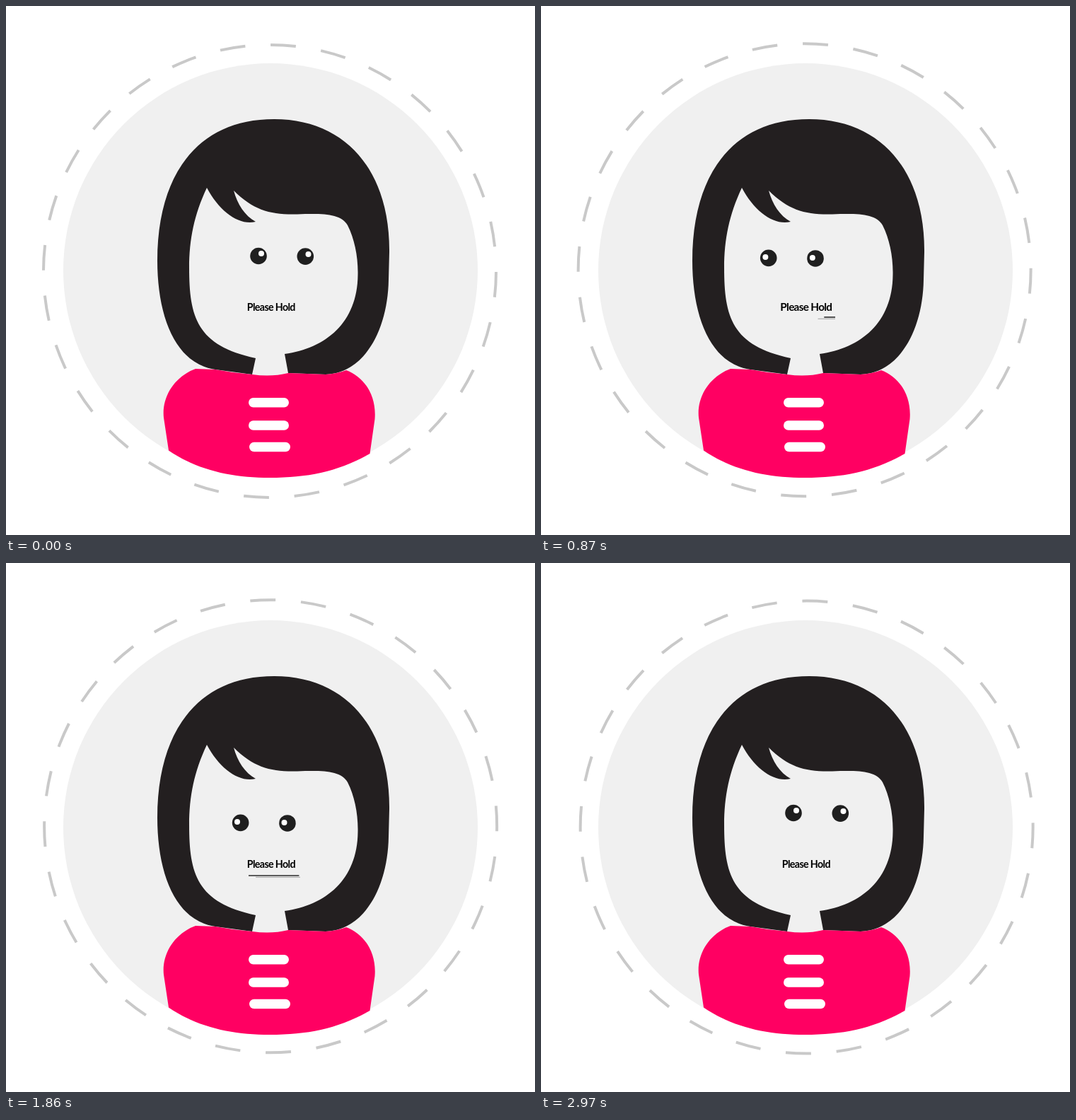
Animation, 748 px wide and 748 px high, one loop 3 s. Source, as an HTML page:

```html
<!DOCTYPE html>
<html lang="en">
<head>
<meta charset="utf-8">
<title>Please Hold</title>
<style>
  html, body { margin: 0; width: 100%; height: 100%; overflow: hidden; background: #fff; }
  svg { display: block; width: 748px; height: 748px; }
  #label {
    font-family: Lato, "Open Sans", sans-serif;
    font-weight: 700;
    letter-spacing: -.045em;
    text-anchor: middle;
  }
</style>
</head>
<body>
<svg viewBox="0 0 748 748">
  <g id="ring">
    <circle cx="373" cy="374.9" r="320" fill="none" stroke="#c9c9c9" stroke-width="4"
            pathLength="56" stroke-dasharray="1 1"/>
  </g>
  <circle cx="374" cy="374" r="293" fill="#f0f0f0"/>

  <path id="hair" fill="#231f20" d="M379 160 C482 160 543 235 542 348 L541 387
    C540 456 508 519 452 521 L399 519 L394 492 C452 484 497 448 497.5 380
    C498 355 493 330 483 310 C473 293 447 293.5 412 294.5 C375 295.5 350 289 322 261
    C327 280 338 297 353 305 C330 311 302 291 284 257 C266 295 259 330 259 370
    C259 440 270 480 353 498 L348 521 L296 514 C240 506 214 440 214 360
    C214 237 272 160 379 160Z"/>
  <path id="shirt" fill="#ff0062" d="M268 513 L296 514 Q322 519 348 521 Q375 525 399 519
    L452 521 Q468 520 481 515 C508 525 524 552 521.5 584 L514.5 633
    C470 658 428 667 373 667 C320 667 272 657 230 628.5
    L223 582 C220 553 238 524 268 513Z"/>
  <g fill="#fff">
    <rect x="343" y="554" width="57" height="13.5" rx="6.7"/>
    <rect x="343" y="586.3" width="57" height="13.5" rx="6.7"/>
    <rect x="344" y="616.8" width="58" height="13.5" rx="6.7"/>
  </g>

  <g id="pupils" fill="#1f1f1f">
    <circle r="11.8"/>
    <circle cx="66.3" cy=".6" r="11.8"/>
  </g>
  <g id="glints" fill="#fff">
    <circle r="4"/>
    <circle cx="66.5" cy="1" r="4"/>
  </g>

  <line id="shade" stroke="#a0a0a0" stroke-width="1"/>
  <line id="stroke" stroke="#2b2b2b" stroke-width="1.6"/>
  <g id="pulse"><text id="label" y="5.5">Please Hold</text></g>
</svg>
<script>
  const $ = id => document.getElementById(id);
  const LOOP = 3000, STEP = 30;

  // [time, value] pairs joined by a smooth monotone curve
  const LOOK = [[0, 0], [570, .667], [870, .94], [1000, 1], [1500, 1],
                [1860, .64], [2460, .03], [2550, 0], [3000, 0]];
  const SWELL = [[0, 0], [360, .03], [570, .2], [870, .68], [1010, 1], [1380, .2], [1500, 0]];

  function slope(keys, i) {
    if (i === 0 || i === keys.length - 1) return 0;
    const rise = j => (keys[j + 1][1] - keys[j][1]) / (keys[j + 1][0] - keys[j][0]);
    const a = rise(i - 1), b = rise(i);
    return a * b <= 0 ? 0 : 2 * a * b / (a + b);
  }

  function curve(keys, t) {
    if (t <= keys[0][0]) return keys[0][1];
    const i = keys.findIndex((k, n) => n < keys.length - 1 && t <= keys[n + 1][0]);
    const [t0, v0] = keys[i], [t1, v1] = keys[i + 1];
    const d = t1 - t0, u = (t - t0) / d, w = 1 - u;
    return v0 * (1 + 2 * u) * w * w + slope(keys, i) * d * u * w * w
         + v1 * u * u * (3 - 2 * u) - slope(keys, i + 1) * d * u * u * w;
  }

  function smooth(from, to, t) {
    const u = Math.min(1, Math.max(0, (t - from) / (to - from)));
    return u * u * (3 - 2 * u);
  }

  // Half ellipse hanging below (cx, cy), from right to left
  function swing(el, t, cx, cy, rx, ry) {
    const a = Math.PI * curve(LOOK, t);
    el.setAttribute("transform", `translate(${cx + rx * Math.cos(a)} ${cy + ry * Math.sin(a)})`);
  }

  // Drawn left to right first, then right to left
  function underline(el, t, y) {
    const left = 338, width = 78, back = t >= 1500;
    const a = back ? 1 - smooth(1530, 1920, t) : smooth(450, 1040, t);
    const b = back ? 1 - smooth(1800, 2500, t) : smooth(0, 620, t);
    const row = y + (back ? 2 : 0);
    el.setAttribute("x1", left + width * a);
    el.setAttribute("x2", left + width * b);
    el.setAttribute("y1", row);
    el.setAttribute("y2", row);
    el.style.display = b - a > .001 ? "" : "none";
  }

  function fitLabel() {
    const label = $("label");
    label.style.fontSize = "100px";
    label.style.fontSize = 100 * 68 / label.getComputedTextLength() + "px";
  }

  function draw(t) {
    $("ring").setAttribute("transform", `rotate(${.2 + .07315 * t} 374.1 373.8)`);
    swing($("pupils"), t, 339.2, 353.5, 17.8, 15.3);
    swing($("glints"), t - 35, 338.8, 350, 22.2, 19);
    underline($("stroke"), t, 440);
    underline($("shade"), t - 50, 442.3);
    const scale = 1 + .112 * curve(SWELL, t % 1500);
    $("pulse").setAttribute("transform", `translate(374.8 425) scale(${scale})`);
  }

  const start = performance.now();
  function tick() {
    const t = (performance.now() - start) % LOOP;
    draw(Math.floor(t / STEP) * STEP);
    requestAnimationFrame(tick);
  }
  fitLabel();
  tick();
</script>
</body>
</html>
```
